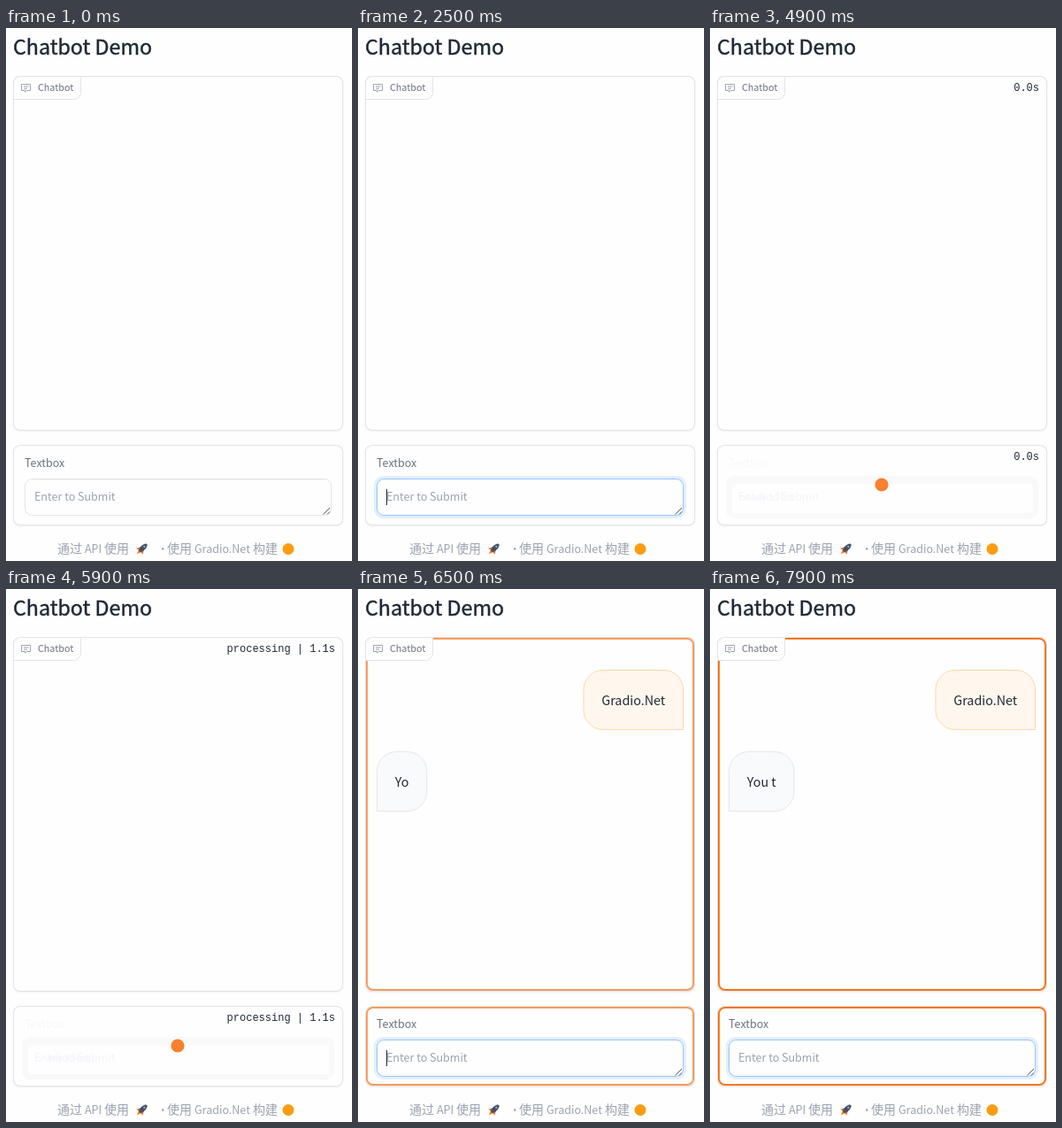
Recreate the animation shown at these times as an HTML page with a canvas. Size 391 px wide and 601 px high, loop 8000 ms.

```html
<!DOCTYPE html>
<html lang="zh">
<head>
<meta charset="utf-8">
<title>Chatbot Demo</title>
<style>
  html, body { margin: 0; width: 100%; height: 100%; overflow: hidden; background: #fefefe; }
  canvas { display: block; width: 391px; height: 601px; }
</style>
</head>
<body>
<canvas id="stage" width="391" height="601"></canvas>
<script>
const ctx = document.getElementById('stage').getContext('2d');
const LOOP = 8000;
const SANS = '"Noto Sans CJK SC", "Noto Sans CJK JP", "Noto Sans", sans-serif';
const MONO = '"Liberation Mono", "DejaVu Sans Mono", monospace';
const INK = '#1f2937', LABEL = '#6b7280', MUTED = '#9ca3af', LINE = '#e4e4e7';
const PAPER = '#fefefe', ORANGE = '#f4771e';

const SUBMIT = 4900, ANSWER = 6000, PULSE_START = 5950;
const QUERY = 'Gradio.Net', REPLY = 'You t', HINT = 'Enter to Submit';
// [time, number of characters shown]
const TYPED = [[2900, 3], [3100, 4], [3300, 5], [3400, 6], [3700, 7], [4100, 8], [4400, 9], [4500, 10]];
const STREAMED = [[6000, 1], [6400, 2], [6900, 3], [7400, 4], [7900, 5]];

const shown = (text, steps, t) =>
  text.slice(0, steps.reduce((count, [time, n]) => (t >= time ? n : count), 0));

// Latin glyphs of the CJK face are about 1.117 times larger than the nominal size.
const latin = (size, weight = 400) => `${weight} ${size / 1.117}px ${SANS}`;

function write(text, x, y, color, font, align = 'left') {
  ctx.font = font;
  ctx.fillStyle = color;
  ctx.textAlign = align;
  ctx.fillText(text, x, y);
}

function widthOf(text, size) {
  ctx.font = latin(size);
  return ctx.measureText(text).width;
}

function box(x, y, w, h, radius, fill, stroke, lineWidth = 1) {
  ctx.beginPath();
  ctx.roundRect(x, y, w, h, radius);
  if (fill) {
    ctx.fillStyle = fill;
    ctx.fill();
  }
  if (stroke) {
    ctx.strokeStyle = stroke;
    ctx.lineWidth = lineWidth;
    ctx.stroke();
  }
}

function disc(x, y, r, color) {
  ctx.fillStyle = color;
  ctx.beginPath();
  ctx.arc(x, y, r, 0, Math.PI * 2);
  ctx.fill();
}

function lines(color, width, ...paths) {
  ctx.strokeStyle = color;
  ctx.lineWidth = width;
  ctx.beginPath();
  for (const [first, ...rest] of paths) {
    ctx.moveTo(...first);
    rest.forEach(p => ctx.lineTo(...p));
  }
  ctx.stroke();
}

function panel(y, h) {
  ctx.save();
  ctx.shadowColor = 'rgba(0,0,0,.06)';
  ctx.shadowBlur = 2;
  ctx.shadowOffsetY = 1;
  box(8, y, 373, h, 8, LINE);
  ctx.restore();
  box(9, y + 1, 371, h - 2, 7, PAPER);
}

function chip() {
  box(8.5, 54.5, 76, 26, [8, 0, 8, 0], PAPER, LINE);
  lines(MUTED, 1,
    [[18.5, 63.5], [27.5, 63.5], [27.5, 70.5], [23.5, 70.5], [21.5, 72], [21.5, 70.5], [17.5, 70.5], [17.5, 63.5], [18.5, 63.5]],
    [[20, 66], [25.5, 66]], [[20, 68.2], [24, 68.2]]);
  write('Chatbot', 36, 71, LABEL, latin(12));
}

function rocket() {
  ctx.save();
  ctx.translate(153.5, 587.5);
  ctx.rotate(-Math.PI / 4);
  ctx.fillStyle = '#f58220';
  ctx.beginPath();
  ctx.moveTo(-8, 0);
  ctx.lineTo(-3, -2);
  ctx.lineTo(-3, 2);
  ctx.fill();
  ctx.fillStyle = '#e8702a';
  ctx.beginPath();
  ctx.moveTo(2, -2);
  ctx.lineTo(-4, -5);
  ctx.lineTo(-3, 0);
  ctx.lineTo(-4, 5);
  ctx.lineTo(2, 2);
  ctx.fill();
  ctx.fillStyle = '#3f5166';
  ctx.beginPath();
  ctx.ellipse(2, 0, 6, 2.8, 0, 0, Math.PI * 2);
  ctx.fill();
  ctx.restore();
  disc(156.3, 584.7, 1, '#b9cbd9');
}

function footer() {
  const han = `14px ${SANS}`;
  const parts = [['通过', 58, han], ['API', 89, latin(14)], ['使用', 111, han], ['·', 171, latin(14)],
    ['使用', 182, han], [QUERY, 213, latin(14)], ['构建', 279, han]];
  for (const [text, x, font] of parts) write(text, x, 592, MUTED, font);
  rocket();
  disc(319, 587.5, 6.5, '#fb9d10');
}

function caretOn(t) {
  if (t < 1500) return false;
  if (t < 2900) return t < 2000 || t >= 2500;
  if (t < SUBMIT) return true;
  return t >= 6300 && Math.floor((t - 6300) / 500) % 2 === 0;
}

function textbox(t) {
  const focused = t >= 1500;
  write('Textbox', 21, 495, LABEL, latin(14));
  if (focused) box(18, 505, 353, 48, 11, '#e3effd');
  box(21.5, 508.5, 346, 41, 8, PAPER, focused ? '#93c5fd' : LINE);
  if (!focused) lines('#f5f5f6', 1, [[28, 509.5], [361, 509.5]]);
  lines('#55585e', 1, [[358.5, 548.5], [366, 541]], [[363, 548.5], [366, 545.5]]);

  const typed = t < SUBMIT ? shown(QUERY, TYPED, t) : '';
  if (typed) write(typed, 32, 533, INK, latin(14));
  else write(HINT, 32, 533, MUTED, latin(14));
  if (caretOn(t)) {
    ctx.fillStyle = INK;
    ctx.fillRect(Math.round(32 + widthOf(typed, 14) - 0.4), 520, 1, 18);
  }
}

function pending(t) {
  const ghost = '#f5f5fa';
  write('Textbox', 21, 495, '#f7f7f8', latin(14));
  box(18, 505, 353, 48, 9, '#f9f9fa');
  box(25, 514, 340, 33, 4, PAPER);
  write(HINT, 32, 533, ghost, latin(14));
  write(QUERY, 32, 533, ghost, latin(14));

  const elapsed = (t - SUBMIT) / 1000;
  const seconds = (Math.floor(elapsed * 11 + 1e-6) / 10).toFixed(1);
  const status = elapsed < 0.1 ? `${seconds}s` : `processing | ${seconds}s`;
  for (const y of [71, 487]) write(status, 372, y, INK, `12px ${MONO}`, 'right');
  disc(194, 515, 7 + 0.6 * Math.cos(elapsed * Math.PI * 2), '#f9802f');
}

function bubbles(t) {
  const pad = 20.8;
  const userWidth = widthOf(QUERY, 16) + pad * 2;
  box(368 - userWidth + 0.5, 91.5, userWidth - 1, 67, [22, 22, 0, 22], '#fff7ed', '#fed7aa');
  write(QUERY, 368 - userWidth + pad, 131, INK, latin(16));

  const reply = shown(REPLY, STREAMED, t).trim();
  box(21.5, 183.5, widthOf(reply, 16) + pad * 2 - 1, 67, [22, 22, 22, 0], '#f9fafb', '#e5e7eb');
  write(reply, 21 + pad, 223, INK, latin(16));
}

function pulse(t) {
  const phase = ((t - PULSE_START) % 2000) / 1000;
  const k = phase < 1 ? phase : 2 - phase;
  ctx.globalAlpha = 1 - 0.5 * k * k * (3 - 2 * k);
  box(10, 56, 369, 396, 7, null, ORANGE, 2);
  box(10, 472, 369, 87, 7, null, ORANGE, 2);
  ctx.globalAlpha = 1;
}

function title() {
  write('Chatbot Demo', 8, 30, INK, latin(26, 500));
  ctx.strokeStyle = INK;
  ctx.lineWidth = 0.45;
  ctx.strokeText('Chatbot Demo', 8, 30);
}

function draw(t) {
  ctx.fillStyle = PAPER;
  ctx.fillRect(0, 0, 391, 601);
  title();
  panel(54, 400);
  panel(470, 91);
  if (t >= SUBMIT && t < ANSWER) pending(t);
  else textbox(t);
  if (t >= ANSWER) {
    bubbles(t);
    pulse(t);
  }
  chip();
  footer();
}

const start = performance.now();
function tick() {
  draw((performance.now() - start) % LOOP);
  requestAnimationFrame(tick);
}
tick();
</script>
</body>
</html>
```
